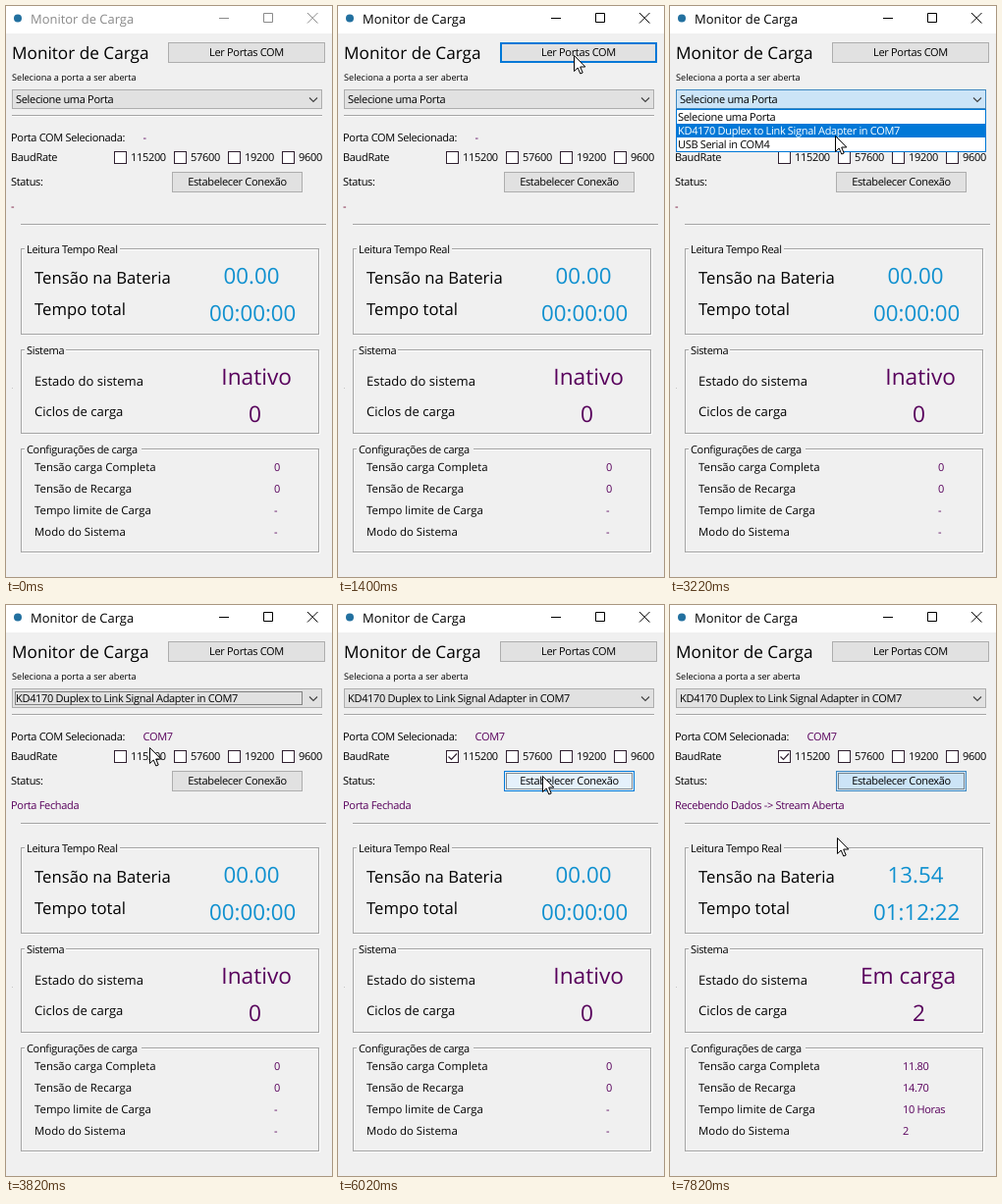
An HTML page that plays this animation: 332 px wide and 582 px high, repeating every 8 s.

```html
<!DOCTYPE html>
<html lang="pt">
<head>
<meta charset="utf-8">
<title>Monitor de Carga</title>
<style>
html, body { margin: 0; width: 100%; height: 100%; overflow: hidden; background: #f0f0f0; }
svg { display: block; width: 332px; height: 582px; }
text { font-family: "Open Sans", "Noto Sans", sans-serif; white-space: pre; text-rendering: geometricPrecision; }
.ui { font-size: 11px; letter-spacing: -.32px; }
.row { font-size: 11.4px; }
.tiny { font-size: 9.15px; }
.title { font-size: 12.95px; }
.mid { font-size: 13.05px; }
.head { font-size: 17.2px; }
.label { font-size: 16.7px; }
.big { font-size: 22.3px; }
.state { font-size: 22.7px; }
</style>
</head>
<body>
<svg id="stage" viewBox="0 0 332 582" xmlns="http://www.w3.org/2000/svg"></svg>
<script>
const LOOP = 8000;
const INK = '#000', PURPLE = '#58005c', BLUE = '#0f90cf', ACCENT = '#0078d7', LINE = '#a3a3a3';
const PROMPT = 'Selecione uma Porta';
const DEVICE = 'KD4170 Duplex to Link Signal Adapter in COM7';

// fill, border colour, border width
const LOOKS = {
  normal: ['#e1e1e1', '#adadad', 1],
  hover: ['#e5f1fb', ACCENT, 1],
  open: ['#cce4f7', '#3f88c0', 1],
  down: ['#cce4f7', '#005499', 1],
  focus: ['#e1e1e1', ACCENT, 2]
};

const START = {
  cursor: null, active: false, read: 'normal', connect: 'normal',
  combo: 'normal', comboText: PROMPT, comboFocus: false, popup: -1,
  port: '-', status: '-', checked: false, checkHot: false, checkFocus: false,
  connectFocus: false, live: false, clock: '00:00:00'
};

// Each step overrides part of the state from its time on.
const STEPS = [
  [0, {}],
  [200, { cursor: [252, 382] }],
  [400, { cursor: [240, 225] }],
  [600, { cursor: [233, 97], combo: 'hover' }],
  [800, { cursor: [234, 67] }],
  [1000, { cursor: [240, 52], combo: 'normal', read: 'hover' }],
  [1200, { cursor: [241, 49], active: true, read: 'down' }],
  [1400, { cursor: [240, 50], read: 'focus' }],
  [1600, { cursor: [223, 72] }],
  [1800, { cursor: [208, 94], combo: 'hover' }],
  [2000, { cursor: [207, 94], popup: 0 }],
  [2200, { cursor: [192, 111], combo: 'open', read: 'normal' }],
  [2400, { cursor: [175, 126], popup: 1 }],
  [2600, { cursor: [171, 130] }],
  [2800, { cursor: [169, 132] }],
  [3220, { cursor: [168, 132] }],
  [3420, { popup: -1, combo: 'normal', comboText: DEVICE, comboFocus: true, port: 'COM7', status: 'Porta Fechada' }],
  [3620, { cursor: [162, 137] }],
  [3820, { cursor: [146, 145] }],
  [4020, { cursor: [128, 152] }],
  [4220, { cursor: [118, 155], checkHot: true }],
  [4420, { cursor: [117, 155], checked: true, checkFocus: true, comboFocus: false }],
  [4820, { cursor: [126, 158] }],
  [5020, { cursor: [146, 167] }],
  [5220, { cursor: [186, 173], checkHot: false, connect: 'hover' }],
  [5420, { cursor: [208, 174] }],
  [5620, { connect: 'down' }],
  [6020, { connect: 'hover', connectFocus: true, checkFocus: false }],
  [6220, { connect: 'open', status: 'Recebendo Dados -> Stream Aberta' }],
  [6420, { live: true, clock: '01:12:21' }],
  [7020, { cursor: [204, 178] }],
  [7220, { cursor: [188, 202], clock: '01:12:22' }],
  [7420, { cursor: [171, 228] }],
  [7620, { cursor: [169, 235] }],
  [7820, { cursor: [170, 237] }]
];

const esc = s => s.replace(/&/g, '&amp;').replace(/</g, '&lt;').replace(/>/g, '&gt;');
const text = (s, x, y, cls = 'ui', fill = INK, anchor = 'start') =>
  `<text x="${x}" y="${y}" class="${cls}" fill="${fill}" text-anchor="${anchor}">${esc(s)}</text>`;
const rect = (x, y, w, h, fill) => `<rect x="${x}" y="${y}" width="${w}" height="${h}" fill="${fill}"/>`;
const path = (d, stroke, width = 1, fill = 'none') =>
  `<path d="${d}" fill="${fill}" stroke="${stroke}" stroke-width="${width}"/>`;

function box(x, y, w, h, fill, stroke, width = 1, dash = '') {
  const i = width / 2;
  return `<rect x="${x + i}" y="${y + i}" width="${w - width}" height="${h - width}" fill="${fill}" stroke="${stroke}" stroke-width="${width}" stroke-dasharray="${dash}"/>`;
}
const dotted = (x, y, w, h) => box(x, y, w, h, 'none', '#222', 1, '1 1');

function button(label, x, y, w, h, look) {
  return box(x, y, w, h, ...LOOKS[look]) + text(label, x + w / 2, y + 14, 'ui', INK, 'middle');
}

function group(label, y, h, gap) {
  return box(16, y + 1, 304, h, 'none', '#fff') + box(15, y, 304, h, 'none', LINE) +
    rect(19, y - 2, gap, 5, '#f0f0f0') + text(label, 21, y + 5);
}

function titleBar(s) {
  const ink = s.active ? '#000' : '#8a8a8a';
  return rect(0, 0, 332, 28, '#fff') + '<circle cx="12" cy="12.5" r="4" fill="#22709f"/>' +
    text('Monitor de Carga', 25, 18, 'title', ink) +
    path('M217 12.5h10M262.5 7.5h9v9h-9zM307 7l10.5 10.5M317.5 7L307 17.5', ink);
}

function combo(s) {
  return box(6, 85, 316, 20, ...LOOKS[s.combo]) +
    (s.comboFocus ? dotted(9, 88, 293, 14) : '') +
    text(s.comboText, 10, 99) + path('M309 93.5l4 4l4-4', '#404040', 1.1);
}

function popup(s) {
  if (s.popup < 0) return '';
  const rows = [PROMPT, DEVICE, 'USB Serial in COM4'];
  return box(6, 105, 316, 44, '#fff', ACCENT) + rows.map((row, i) => {
    const on = i === s.popup, y = 106 + 14 * i;
    return (on ? rect(7, y, 314, 14, ACCENT) : '') + text(row, 8, y + 11, 'ui', on ? '#fff' : INK);
  }).join('');
}

function checks(s) {
  return [[110, '115200'], [171, '57600'], [226, '19200'], [281, '9600']].map(([x, rate], i) => {
    const ink = !i && s.checkHot ? ACCENT : '#302030';
    return box(x, 148, 13, 13, '#fff', ink) + text(rate, x + 17, 158) +
      (!i && s.checked ? path('M112.5 154.5l3 3l5.5-6', ink, 1.2) : '');
  }).join('') + (s.checkFocus ? dotted(126, 147, 37, 14) : '');
}

function readings(s) {
  const on = s.live;
  const settings = [
    ['Tensão carga Completa', '0', '11.80'],
    ['Tensão de Recarga', '0', '14.70'],
    ['Tempo limite de Carga', '-', '10 Horas'],
    ['Modo do Sistema', '-', '2']
  ];
  return group('Leitura Tempo Real', 247, 88, 97) +
    text('Tensão na Bateria', 29, 283, 'label') + text('Tempo total', 29, 315, 'label') +
    text(on ? '13.54' : '00.00', 221.5, 283, 'big', BLUE) + text(s.clock, 207, 321, 'big', BLUE) +
    group('Sistema', 350, 86, 42) +
    text('Estado do sistema', 29, 387, 'mid') + text('Ciclos de carga', 29, 418, 'mid') +
    text(on ? 'Em carga' : 'Inativo', 291, 386, 'state', PURPLE, 'end') +
    text(on ? '2' : '0', 253.5, 424, 'state', PURPLE, 'middle') +
    group('Configurações de carga', 451, 106, 119) +
    settings.map(([label, idle, value], i) => {
      const y = 474 + 22 * i;
      return text(label, 29, y, 'row') + text(on ? value : idle, on ? 237 : 273, y, 'ui', PURPLE);
    }).join('') + rect(6, 389, 1, 1, '#c4c4c4');
}

function pointer(s) {
  if (!s.cursor) return '';
  return `<g transform="translate(${s.cursor[0] + .5} ${s.cursor[1] + .5})">` +
    path('M0 0V16L3.7 12.5L6.3 18.5L8.7 17.5L6.2 11.5H11.3Z', '#000', 1, '#fff') + '</g>';
}

function view(s) {
  return rect(0, 0, 332, 582, '#f0f0f0') + titleBar(s) +
    text('Monitor de Carga', 6, 54, 'head') + button('Ler Portas COM', 165, 37, 160, 21, s.read) +
    text('Seleciona a porta a ser aberta', 6, 76, 'tiny') + combo(s) +
    rect(6, 111, 316, 1, LINE) + rect(6, 112, 316, 1, '#fff') +
    text('Porta COM Selecionada:', 5, 138) + text(s.port, 139.5, 138, 'ui', PURPLE) +
    text('BaudRate', 5, 158) + checks(s) +
    text('Status:', 5, 183) + button('Estabelecer Conexão', 169, 169, 133, 21, s.connect) +
    (s.connectFocus ? dotted(171, 171, 129, 17) : '') +
    text(s.status, 5, 208, 'ui', s.status === '-' ? '#700830' : PURPLE) +
    rect(15, 222, 311, 1, LINE) + rect(15, 223, 311, 1, '#fff') +
    readings(s) + popup(s) + pointer(s);
}

const stage = document.getElementById('stage');
const origin = performance.now();
let shown = 0;

function frame(now) {
  const t = Math.max(0, now - origin) % LOOP;
  const past = STEPS.filter(([at]) => at <= t);
  if (past.length !== shown) {
    shown = past.length;
    stage.innerHTML = view(Object.assign({}, START, ...past.map(step => step[1])));
  }
  requestAnimationFrame(frame);
}
frame(origin);
</script>
</body>
</html>
```
